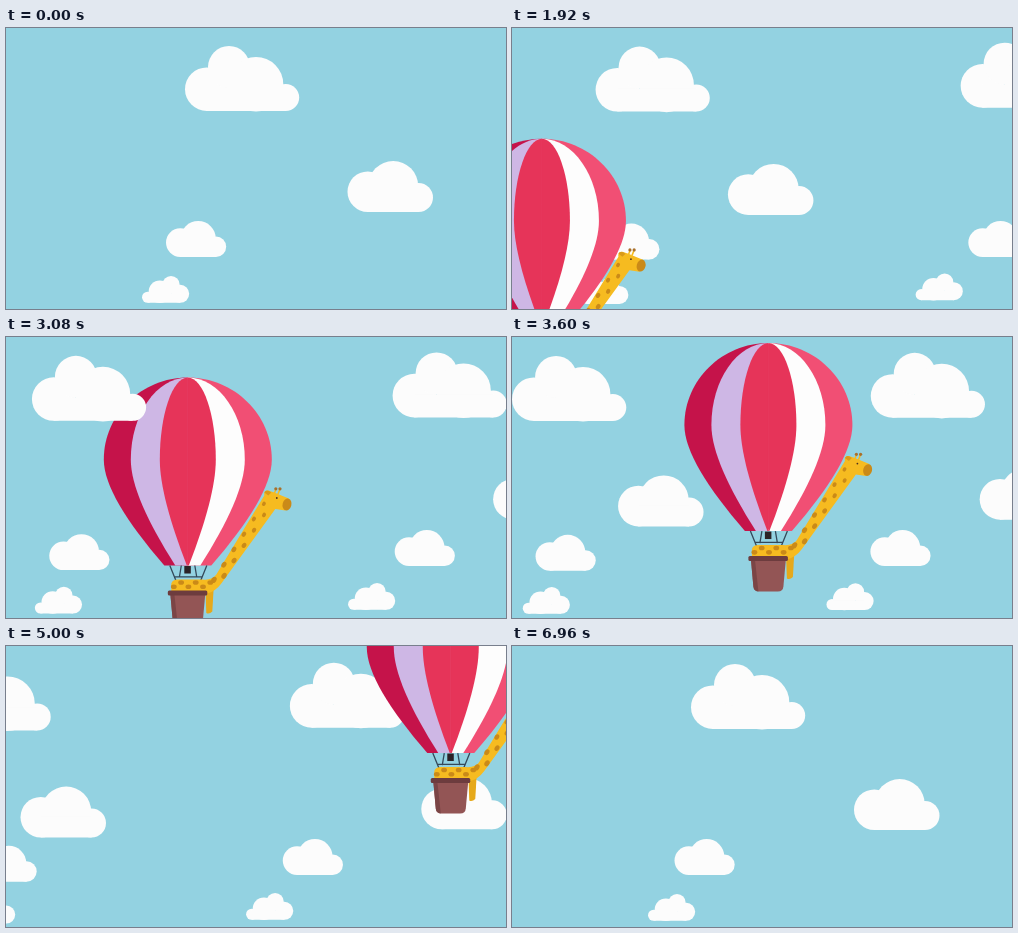
An HTML page for the animation above (7 s loop, 500 px wide and 281 px high).

```html
<!DOCTYPE html>
<html lang="en">
<head>
<meta charset="utf-8">
<title>Giraffe in a balloon</title>
<style>
  html, body { margin: 0; width: 100%; height: 100%; overflow: hidden; background: #93d2e1; }
  svg { display: block; width: 100vw; height: 100vh; }
</style>
</head>
<body>
<svg viewBox="0 0 500 281" preserveAspectRatio="none">
  <defs>
    <g id="tall" fill="#fcfcfc">
      <circle cx="21.8" cy="43.2" r="21.8"/>
      <circle cx="44" cy="21" r="21"/>
      <circle cx="71" cy="38.3" r="27.3"/>
      <circle cx="100.7" cy="51.5" r="13.5"/>
      <path d="M21.8 42H100.7V65H21.8z"/>
    </g>
    <g id="wide" fill="#fcfcfc">
      <circle cx="20.3" cy="30.7" r="20.3"/>
      <circle cx="45.7" cy="25" r="25"/>
      <circle cx="71" cy="36.5" r="14.5"/>
      <path d="M20.3 30H71V51H20.3z"/>
    </g>
    <use id="mini" href="#tall" transform="translate(47.2) scale(-.413 .413)"/>
    <use id="small" href="#wide" transform="scale(.704)"/>
  </defs>
  <rect width="500" height="281" fill="#93d2e1"/>
  <g id="back"></g>
  <g id="balloon">
    <g id="envelope"></g>
    <path d="M238.5 194L245 210M275.5 194L269 210M250 194L248 206M263.5 194L265.5 206M243.5 205.3H270.5" fill="none" stroke="#34495a" stroke-width="1.3"/>
    <rect x="253" y="194.5" width="6.5" height="7.5" fill="#2b2226"/>
    <path d="M274 214H282.5L281 240Q278 243 275 241.5Z" fill="#e6a91b"/>
    <path d="M240 222V212Q241 208 247 208H271Q281 209 285 203L333 124Q332 119 337 119L343 121Q350 124 357.5 127L354 139L344 137.5L290 212Q284 220 276 222Z" fill="#f6bb20"/>
    <g id="spots" fill="#ca8a18"></g>
    <path d="M333 121Q335 117 340 121L337 124Z" fill="#d99a1a"/>
    <path d="M343 122L344.5 118M346.5 123L348.5 118" stroke="#f6bb20" stroke-width="1.6"/>
    <g fill="#a9702a">
      <circle cx="344.5" cy="117.3" r="1.6"/>
      <circle cx="348.7" cy="117.3" r="1.6"/>
    </g>
    <ellipse cx="355.7" cy="133" rx="4.4" ry="6" transform="rotate(15 355.7 133)" fill="#ca8a18"/>
    <circle cx="345.5" cy="126.5" r=".9" fill="#4b3020"/>
    <path d="M239 222H274L271.5 249.5Q271 254.5 266 254.5H247Q242 254.5 241.5 249.5Z" fill="#935555"/>
    <path d="M239 222H243L246.5 254.5Q242 254 241.5 249.5Z" fill="#7b4546"/>
    <rect x="236.5" y="219" width="39.5" height="5" rx="1.5" fill="#6d3c3e"/>
  </g>
  <g id="front"></g>
</svg>
<script>
const NS = 'http://www.w3.org/2000/svg';
const LOOP = 7000, STEP = 40, LAST = 6960;
const byId = id => document.getElementById(id);

function add(parent, tag, attrs) {
  const el = document.createElementNS(NS, tag);
  for (const key in attrs) el.setAttribute(key, attrs[key]);
  return byId(parent).appendChild(el);
}

// Position at time `since`, velocity in px per second.
const cloud = (layer, shape, x, y, vx, vy, since = 0) =>
  ({ el: add(layer, 'use', { href: '#' + shape }), x, y, vx, vy, since });

const clouds = [
  cloud('back', 'wide', 341.5, 133, -65.4, 1.5),
  cloud('back', 'small', 160, 193, -37.9, 1.35),
  cloud('back', 'mini', 136, 248, -34.8, .55),
  cloud('back', 'tall', 179, 18, -53.5, .66, LAST),
  cloud('back', 'wide', 342, 133, -37.4, .4, LAST),
  cloud('back', 'small', 162.5, 193, -58.3, 0, LAST),
  cloud('back', 'mini', 136, 248, -53.1, .52, LAST),
  cloud('front', 'tall', 179, 18, -49.7, .28)
];

// Half of a balloon panel; side is -1 for left, 1 for right.
function panel(wide, neck, side, fill) {
  const x = w => 256.5 + side * w;
  const d = `M256.5 6C${x(wide * .55)} 6 ${x(wide)} 43 ${x(wide)} 88` +
    `C${x(wide)} 114 ${x(neck + (wide - neck) * .628)} 150 ${x(neck)} 194H256.5Z`;
  add('envelope', 'path', { d, fill });
}
panel(84, 23.5, -1, '#c5134a');
panel(84, 23.5, 1, '#f14f74');
panel(57, 12.5, -1, '#ceb7e5');
panel(57, 12.5, 1, '#fdfdfd');
panel(28, 1, -1, '#e63459');
panel(28, 1, 1, '#e63459');
// Covers the seam down the middle.
add('envelope', 'path', { d: 'M256.5 7V192', stroke: '#e63459' });

const spot = (cx, cy, rx, ry, turn) =>
  add('spots', 'ellipse', { cx, cy, rx, ry, transform: `rotate(${turn} ${cx} ${cy})` });
for (let i = 0; i < 11; i++) {
  const p = i / 10, shift = i % 2 ? 3.4 : -3;
  spot(285 + 50 * p + shift * .8, 210 - 76 * p + shift * .55, 3.3 - p, 2.5 - .7 * p, -58);
}
for (let i = 0; i < 6; i++) spot(242.5 + 7.3 * i, i % 2 ? 211 : 215.3, 2.9, 2.3, 0);

function place(el, x, y) {
  el.setAttribute('transform', `translate(${x.toFixed(2)} ${y.toFixed(2)})`);
}

function draw(ms) {
  const t = Math.floor((ms % LOOP) / STEP) * STEP;
  for (const c of clouds) {
    const s = (t - c.since) / 1000;
    place(c.el, c.x + c.vx * s, c.y + c.vy * s);
  }
  const p = t / LOOP, eased = p * p * (3 - 2 * p);
  const dx = 672 * (eased - .5) - 14.5;
  place(byId('balloon'), dx, -.462 * dx);
}

let start;
function tick(now) {
  start ??= now;
  draw(now - start);
  requestAnimationFrame(tick);
}
draw(0);
requestAnimationFrame(tick);
</script>
</body>
</html>
```
